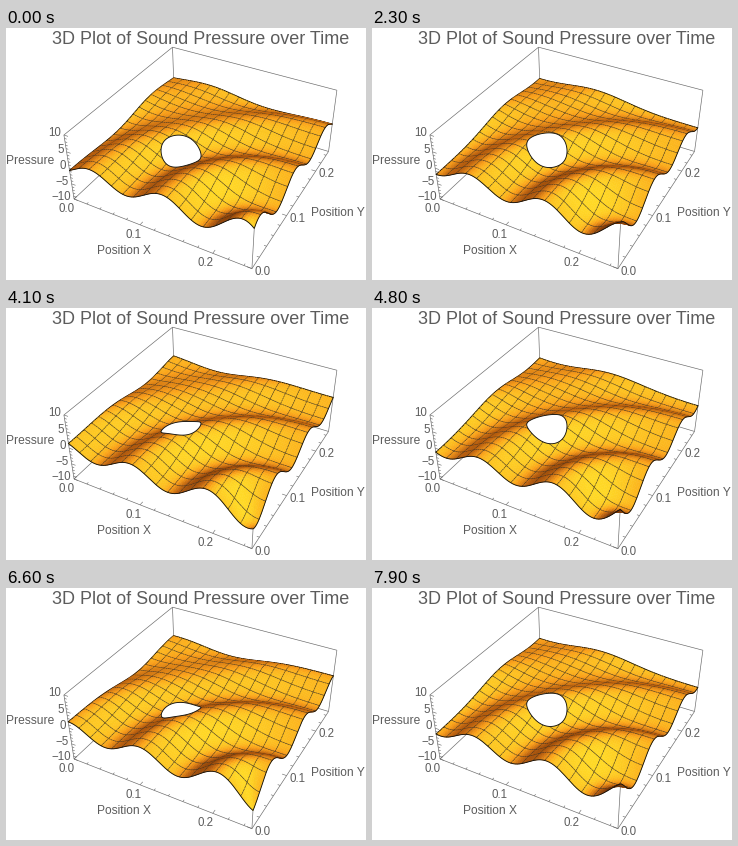
Recreate the animation shown at these times as a matplotlib script. Size 360 px wide and 252 px high, loop 8 s.

```python
import numpy as np
import matplotlib.pyplot as plt
from matplotlib.animation import FuncAnimation
from matplotlib.collections import LineCollection, PolyCollection

W, H, DPI = 360, 252, 72
FRAMES, STEP = 80, 100
CELLS, MESH = 80, 5            # cells per side, cells per mesh line
SIDE, ZMAX = 0.25, 10
HOLE, HOLE_R = (0.405, 0.395), 0.102
PERIOD, WAVELEN = 2870, 0.405

plt.rcParams["font.family"] = "Liberation Sans"

# Perspective camera looking at the middle of a 1 x 1 x 0.4 box
EYE = np.array([1.3, -2.4, 2.0])
DIST = np.linalg.norm(EYE)
FWD = -EYE / DIST
RIGHT = np.cross(FWD, [0, 0, 1])
RIGHT /= np.linalg.norm(RIGHT)
UP = np.cross(RIGHT, FWD)


def project(x, y, z):
    """Unit x, y and pressure z to stage pixels."""
    x, y, z = np.broadcast_arrays(x, y, z)
    p = np.stack([x - 0.5, y - 0.5, z * 0.2 / ZMAX], axis=-1)
    depth = DIST + p @ FWD
    return np.stack([201.2 + 656 * (p @ RIGHT) / depth,
                     115.9 - 656 * (p @ UP) / depth], axis=-1)


def pressure(x, y, t):
    """Circular wave leaving the front corner, weak in the hole's shadow."""
    r, w = np.hypot(x - 1, y), x + y - 1
    amp = 2.0 + 2.4 * np.exp(-r / 0.25)
    behind = 1 / (1 + np.exp((0.85 - r) / 0.08))
    amp = amp * (1 - 0.75 * behind * np.exp(-(w / 0.6) ** 2))
    return -amp * np.cos(2 * np.pi * ((t - 980) / PERIOD - r / WAVELEN))


# Surface grid and its back-to-front drawing order
u = np.linspace(0, 1, CELLS + 1)
X, Y = np.meshgrid(u, u, indexing="ij")
hx, hy = [a.ravel() for a in np.meshgrid(np.arange(CELLS), np.arange(CELLS),
                                         indexing="ij")]
solid = (np.hypot((hx + 0.5) / CELLS - HOLE[0], (hy + 0.5) / CELLS - HOLE[1])
         > HOLE_R - 0.02)
ci, cj = hx[solid], hy[solid]


def node(i, j):
    return i * (CELLS + 1) + j


rank = 3 * ((CELLS - 1 - cj) * CELLS + ci)
quads = np.stack([node(ci, cj), node(ci + 1, cj),
                  node(ci + 1, cj + 1), node(ci, cj + 1)], axis=1)
left, back = ci % MESH == 0, (cj + 1) % MESH == 0
segs_l = quads[left][:, [0, 3, 3, 0]]
segs_b = quads[back][:, [3, 2, 2, 3]]
order = np.argsort(np.concatenate([rank, rank[left] + 1, rank[back] + 2]))
polys = np.concatenate([quads, segs_l, segs_b])[order]

n_quads, n_segs = len(quads), len(segs_l) + len(segs_b)
rim = np.concatenate([np.zeros(n_quads, bool), ci[left] == 0,
                      cj[back] == CELLS - 1])
is_line = np.arange(n_quads + n_segs) >= n_quads
widths = np.where(rim, 0.9, np.where(is_line, 0.6, 0.5))[order]
line_rgb = np.where(rim[n_quads:, None], [0.08, 0.07, 0.05], [0.24, 0.2, 0.15])

LIGHT = np.array([0.62, -0.45, 0.75])
LIGHT /= np.linalg.norm(LIGHT)
RAMP_AT = [-0.2, 0.35, 0.7, 1.0]
RAMP = np.array([[105, 45, 8], [190, 98, 14],
                 [250, 158, 24], [255, 218, 38]]) / 255


def shade(z):
    gx, gy = np.gradient(z * 0.2 / ZMAX, 1 / CELLS)
    lit = ((-gx * LIGHT[0] - gy * LIGHT[1] + LIGHT[2])
           / np.sqrt(gx ** 2 + gy ** 2 + 1))
    lit = lit.ravel()[quads].mean(axis=1)
    return np.stack([np.interp(lit, RAMP_AT, RAMP[:, k]) for k in range(3)],
                    axis=1)


# Stage
fig = plt.figure(figsize=(W / DPI, H / DPI), dpi=DPI, facecolor="white")
ax = fig.add_axes([0, 0, 1, 1])
ax.set(xlim=(0, W), ylim=(H, 0))
ax.axis("off")

GRAY, INK = "#6a6a6a", "#5c5c5c"


def lines(pairs, width):
    segs = [project(*np.array(p, float).T) for p in pairs]
    ax.add_collection(LineCollection(segs, colors=GRAY, linewidths=width,
                                     zorder=1))


def label(x, y, text, size=11.5, ha="center"):
    ax.text(x, y, text, size=size, color=INK, ha=ha, va="center_baseline",
            zorder=6)


lo, hi = -ZMAX, ZMAX
corners = [(0, 0), (1, 0), (1, 1), (0, 1)]
box = []
for a, b in zip(corners, corners[1:] + corners[:1]):
    box += [((*a, lo), (*b, lo)), ((*a, lo), (*a, hi))]
    if 0 in (a[0], b[0]) and a[1] != b[1] or a[1] == b[1] == 1:
        box.append(((*a, hi), (*b, hi)))
lines(box, 0.65)

ticks = []
for k in range(13):
    p, d = k * 0.02 / SIDE, 0.024 if k % 5 == 0 else 0.013
    ticks += [((p, 0, lo), (p, d, lo)), ((1, p, lo), (1 - d, p, lo))]
for z in range(lo, hi + 1):
    d = 0.024 if z % 5 == 0 else 0.013
    ticks.append(((0, 0, z), (d, 0, z)))
lines(ticks, 0.6)

for val in (0, 0.1, 0.2):
    px, py = project(val / SIDE, 0, lo)
    label(px - 7, py + 8.5, f"{val:.1f}")
    px, py = project(1, val / SIDE, lo)
    label(px + 10.5, py + 1.5, f"{val:.1f}")
for val in (10, 5, 0, -5, -10):
    px, py = project(0, 0, val)
    label(px - 3, py - 3.5, f"{val}".replace("-", "\u2212"), ha="right")

label(194.5, 9, "3D Plot of Sound Pressure over Time", 18)
label(24, 131.5, "Pressure", 12)
label(118, 221.5, "Position X", 12)
label(331.5, 183.5, "Position Y", 12)

surface = PolyCollection([], linewidths=widths, zorder=2)
ax.add_collection(surface)
hole = plt.Polygon([(0, 0)] * 3, facecolor="white", edgecolor="#14120d",
                   linewidth=0.9, zorder=3)
ax.add_patch(hole)
edge, = ax.plot([], [], color="#14120d", linewidth=0.9, zorder=4)

ang = np.linspace(0, 2 * np.pi, 90)
hole_x = HOLE[0] + HOLE_R * np.cos(ang)
hole_y = HOLE[1] + HOLE_R * np.sin(ang)
edge_x = np.concatenate([u, np.ones(CELLS)])
edge_y = np.concatenate([np.zeros(CELLS), u])


def draw(frame):
    t = frame * STEP
    z = pressure(X, Y, t)
    pts = project(X, Y, z).reshape(-1, 2)
    rgb = np.concatenate([shade(z), line_rgb])[order]
    surface.set_verts(pts[polys])
    surface.set_facecolor(rgb)
    surface.set_edgecolor(rgb)
    hole.set_xy(project(hole_x, hole_y, pressure(hole_x, hole_y, t)))
    edge.set_data(*project(edge_x, edge_y, pressure(edge_x, edge_y, t)).T)
    return surface, hole, edge


anim = FuncAnimation(fig, draw, frames=FRAMES, interval=STEP, repeat=True,
                     repeat_delay=0, blit=False)
plt.show()
```
